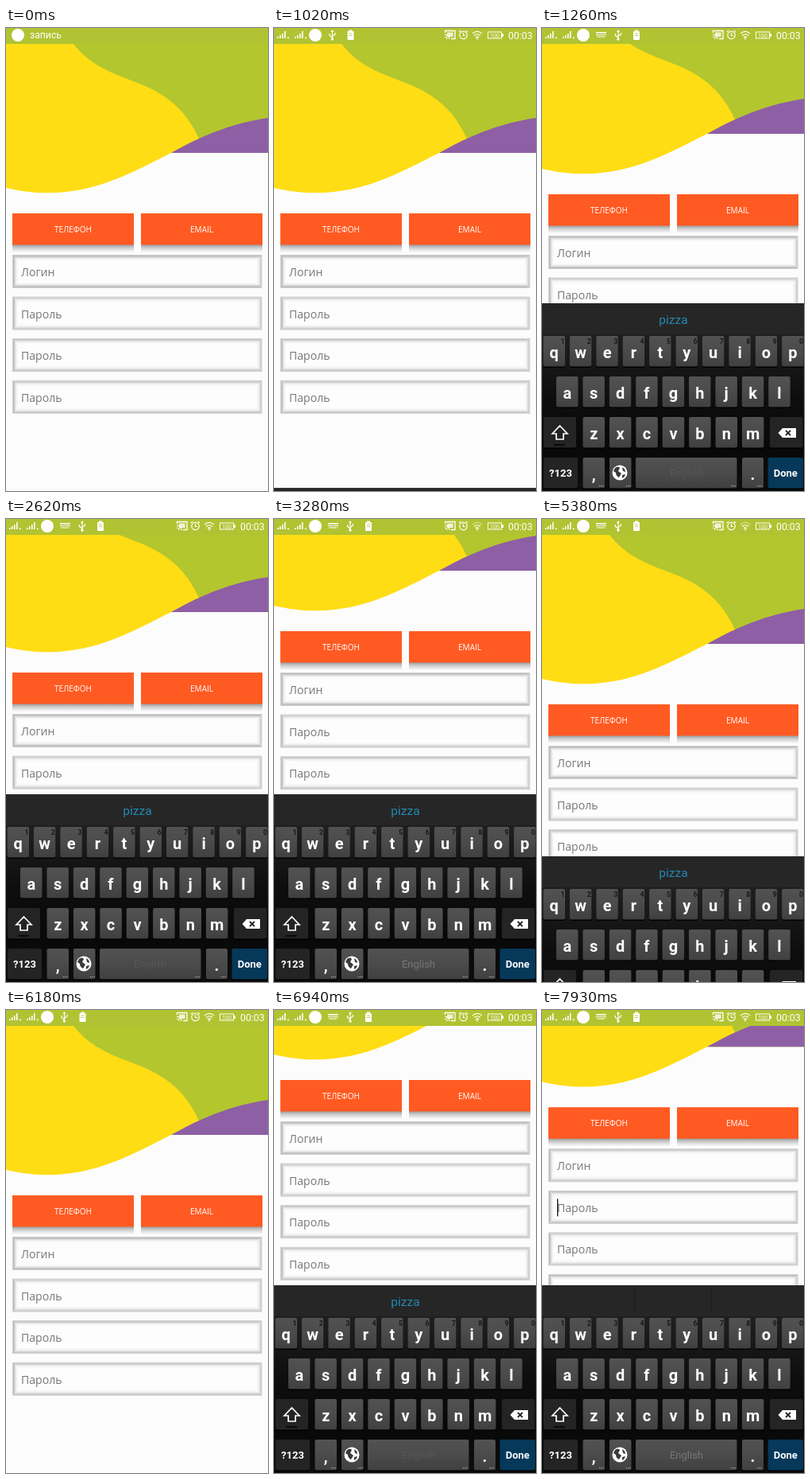
An HTML page for the animation above (7.99 s loop, 330 by 582 pixels).

```html
<!DOCTYPE html>
<html lang="ru">
<head>
<meta charset="utf-8">
<style>
html, body { margin: 0; width: 100%; height: 100%; overflow: hidden; background: #fcfcfc; }
svg { display: block; width: 330px; height: 582px; }
text { white-space: pre; }
.form { font-family: "Open Sans", "Noto Sans", sans-serif; }
.ui { font-family: Roboto, "Noto Sans", sans-serif; }
</style>
</head>
<body>
<svg id="stage" viewBox="0 0 330 582" xmlns="http://www.w3.org/2000/svg"></svg>
<script>
const LOOP = 7990, PAN_TIME = 300, KEYBOARD_HEIGHT = 236;

// [start, target offset]
const pans = [[1182, -40], [2730, -92], [3650, -145], [4330, 0], [6640, -145], [7894, -40]];
// [start, end, field]
const carets = [[1610, 2130, 1], [2720, 3220, 2], [3640, 4110, 3], [4340, 4760, 0],
  [7390, 7800, 3], [7840, LOOP, 1]];
const suggestionTimes = [[1020, 2680], [3030, 3600], [4100, 4320], [4740, 5500], [6470, 7800]];
const labelBright = [[2680, 5500], [7830, LOOP]];
const keyboardTimes = [[1020, 5220], [6470, LOOP + 999]];

const fieldTop = i => 285 + i * 52.6;

const rect = (x, y, w, h, fill, extra = '') =>
  `<rect x="${x}" y="${y}" width="${w}" height="${h}" fill="${fill}" ${extra}/>`;
const path = (d, fill, extra = '') => `<path d="${d}" fill="${fill}" ${extra}/>`;
const line = (d, color, width, extra = '') =>
  path(d, 'none', `stroke="${color}" stroke-width="${width}" ${extra}`);
const text = (x, y, size, str, fill, extra = '') =>
  `<text x="${x}" y="${y}" font-size="${size}" fill="${fill}" ${extra}>${str}</text>`;
const centered = 'text-anchor="middle"';
const bold = centered + ' font-weight="700"';
const gradient = (id, ...colors) => `<linearGradient id="${id}" x2="0" y2="1">` +
  colors.map((c, i) => `<stop offset="${i / (colors.length - 1)}" stop-color="${c}"/>`).join('') +
  '</linearGradient>';

function header() {
  return rect(0, 20, 330, 137, '#b3c62e') +
    path('M208 157C215 153 227 146 243 139C265 129 295 118 330 113V157Z', '#8e5fa4') +
    path('M0 20H85C104 44 125 53 150 63C185 76 220 89 243 139C227 146 215 153 208 157' +
      'C150 186 90 222 0 201Z', '#ffdd15');
}

function button(x, label) {
  return rect(x, 271, 153, 11, 'url(#drop)') + rect(x, 233, 153, 39.5, '#ff5a22') +
    text(x + 76.5, 257, 10, label, '#fff', centered);
}

function field(i, label) {
  const y = fieldTop(i), shades = [205, 190, 200, 220, 235, 244, 249];
  const rims = shades.map((s, k) => rect(8.5 + k, y + .5 + k, 313.5 - 2 * k, 41 - 2 * k, 'none',
    `stroke="rgb(${s},${s},${s})"`)).join('');
  return rect(8, y, 314.5, 42, '#fdfdfd') + rims + text(19, y + 27, 14.1, label, '#777');
}

function signal(x) {
  return [2, 4, 6, 9].map((h, k) => rect(x + k * 3, 13 - h, 1.6, h, '#fff')).join('') +
    rect(x + 13, 11.5, 1.8, 1.8, '#fff');
}

function statusIcons() {
  const usb = line('M73.500 3V14M70 7V9.500L73.500 12M77 6V8L73.500 10.500', '#fff', 1.2) +
    path('M71.500 5L73.500 2L75.500 5Z', '#fff') + '<circle cx="73.500" cy="14" r="1.700" fill="#fff"/>';
  const battery = rect(92.5, 4, 8, 11, '#fff', 'rx="1"') + rect(94.5, 2.5, 4, 2, '#fff') +
    line('M94.500 7H98.500M94.500 9.500H98.500', '#b0c137', .8);
  const keys = rect(68, 5, 13, 1.5, '#fff') +
    line('M68 8.500H81M69.500 11H79.500', '#fff', 1.5, 'stroke-dasharray="1.6 .7"');
  const cast = line('M215.500 6V3.500H228V13.500H223', '#fff', 1.3) +
    line('M215 8A6 6 0 0 1 221 14M215 11A3 3 0 0 1 218 14', '#fff', 1.2) +
    rect(218, 5.5, 7.5, 5.5, '#fff', 'opacity=".8"');
  const alarm = '<circle cx="238.500" cy="9" r="4.700" fill="none" stroke="#fff" stroke-width="1.200"/>' +
    line('M238.500 6V9.500H241M233 5L235.500 2.800M244 5L241.500 2.800', '#fff', 1.1);
  const wifi = line('M250 7Q256 1.800 262 7', '#fff', 1.2, 'id="wifi"') +
    line('M252 9.500Q256 6 260 9.500M254 12Q256 10 258 12', '#fff', 1.2) +
    '<circle cx="256" cy="13.500" r="1" fill="#fff"/>';
  const charge = rect(269.5, 5, 17, 8, 'none', 'stroke="#fff"') + rect(287, 7, 2, 4, '#fff') +
    text(278, 11.7, 7, '100', '#fff', centered);
  return signal(4) + signal(26) + '<circle cx="52" cy="9" r="8" fill="#fff"/>' +
    `<g id="keysIcon">${keys}</g><g id="shifted">${usb}${battery}</g>` +
    cast + alarm + wifi + charge + text(295, 13.6, 12.3, '00:03', '#fff');
}

function key(x, y, w, label = '', fill = 'url(#key)', size = 20) {
  return rect(x, y + 1, w, 39, '#000', 'rx="2"') + rect(x, y, w, 38.5, fill, 'rx="2"') +
    text(x + w / 2, y + (size > 15 ? 27.5 : 24), size, label, '#fff', bold);
}

const keyRow = (letters, x, y) =>
  [...letters].map((c, i) => key(x + i * 33.4, y, 27.5, c)).join('');
const more = x => [0, 2.3, 4.6].map(d => rect(x + d, 575, 1.2, 1.2, '#aaa')).join('');

function keyboard() {
  const digits = [...'1234567890'].map((d, i) =>
    text(26 + i * 33.4, 396.5, 9, d, '#1c1a18', bold)).join('');
  const shift = line('M22.500 500L32 510H27V517H18V510H13Z', '#fff', 1.7) +
    rect(15, 523, 14, 2, '#0a0a0a');
  const erase = path('M297.500 509L303 503H320V515H303Z', '#fff') +
    line('M307 506L313 512M313 506L307 512', '#222', 1.8);
  const globe = '<circle cx="98" cy="559" r="9.500" fill="#fff"/>' +
    path('M92 553Q96 550 98 553L96 557L100 560L97 565Q93 563 93 559L90 557Z' +
      'M101 552Q105 554 105 558L102 557ZM101 562L105 561Q104 565 101 566Z', '#3a3a3a');
  return rect(0, 346, 330, 236, 'url(#board)') + rect(0, 346, 330, 39, '#262626') +
    `<g id="dividers">${rect(116.5, 351, 1, 29, '#1a1a1a')}${rect(212.5, 351, 1, 29, '#1a1a1a')}</g>` +
    text(165.5, 372, 15.5, 'pizza', '#2489b3', centered + ' id="suggestion"') +
    keyRow('qwertyuiop', 1.5, 387) + digits + keyRow('asdfghjkl', 18, 438) +
    key(2, 489, 41, '', '#242424') + shift + keyRow('zxcvbnm', 51.5, 489) +
    key(287, 489, 41.5, '', '#242424') + erase +
    key(2, 540, 43, '?123', '#242424', 13) + key(51.5, 540, 27.5, ',') +
    key(85, 540, 27.5) + globe + key(118, 540, 127.5) +
    text(182, 564, 13, 'English', '#777', centered + ' id="language"') +
    key(252, 540, 27, '.') + key(284.5, 540, 44.5, 'Done', '#06385a', 13) +
    [72, 106, 238, 271].map(more).join('');
}

document.getElementById('stage').innerHTML = `<defs>
  ${gradient('drop', '#8c8c8c', '#cfcfcf', '#fcfcfc')}
  ${gradient('key', '#525252', '#4b4b4b', '#404040')}
  ${gradient('board', '#262626', '#1b1b1b', '#0e0e0e', '#080808', '#0d0d0d')}
  <clipPath id="bar"><rect width="330" height="20"/></clipPath></defs>
  ${rect(0, 0, 330, 582, '#fcfcfc')}
  <g id="page" class="form">${header()}${button(8, 'ТЕЛЕФОН')}${button(170, 'EMAIL')}
    ${['Логин', 'Пароль', 'Пароль', 'Пароль'].map((s, i) => field(i, s)).join('')}
    ${rect(19, 0, 1.3, 22, '#111', 'id="caret"')}</g>
  <g id="keyboard" class="ui">${keyboard()}</g>
  <g class="ui" clip-path="url(#bar)">${rect(0, 0, 330, 20, '#b1c332')}
    <g id="ticker"><circle cx="15" cy="9" r="8" fill="#fff"/>${text(30, 13.3, 12.2, 'запись', '#fff')}</g>
    <g id="icons">${statusIcons()}</g></g>`;

const $ = id => document.getElementById(id);
const set = (id, name, value) => $(id).setAttribute(name, value);
const show = (id, on) => set(id, 'visibility', on ? 'inherit' : 'hidden');
const move = (id, x, y) => set(id, 'transform', `translate(${x} ${y})`);
const progress = (t, start, length) => Math.min(1, Math.max(0, (t - start) / length));
const easeOut = p => 1 - (1 - p) ** 3;
const during = (t, spans) => spans.find(([a, b]) => t >= a && t < b);

function render(t) {
  const offset = pans.reduce((y, [start, to]) =>
    y + (to - y) * easeOut(progress(t, start, PAN_TIME)), 0);
  move('page', 0, offset);

  const caret = during(t, carets);
  show('caret', caret);
  if (caret) set('caret', 'y', fieldTop(caret[2]) + 10.5);

  const raised = keyboardTimes.reduce((v, [open, close]) =>
    v + easeOut(progress(t, open, 190)) - progress(t, close, 280) ** 2, 0);
  move('keyboard', 0, (1 - raised) * KEYBOARD_HEIGHT);
  show('keyboard', raised > 0);
  show('suggestion', during(t, suggestionTimes));
  show('dividers', t >= 7850);
  set('language', 'opacity', during(t, labelBright) ? 1 : .25);

  const swap = easeOut(progress(t, 350, 520));
  move('ticker', 0, -20 * swap);
  move('icons', 0, 20 * (1 - swap));
  set('ticker', 'opacity', 1 - swap);
  set('icons', 'opacity', swap);
  const typing = raised > .3;
  show('keysIcon', typing);
  move('shifted', typing ? 22.5 : 0, 0);
  set('wifi', 'opacity', t >= 3240 && t < 6180 ? .5 : 1);
}

const began = performance.now();
function tick() {
  render((performance.now() - began) % LOOP);
  requestAnimationFrame(tick);
}
tick();
</script>
</body>
</html>
```
